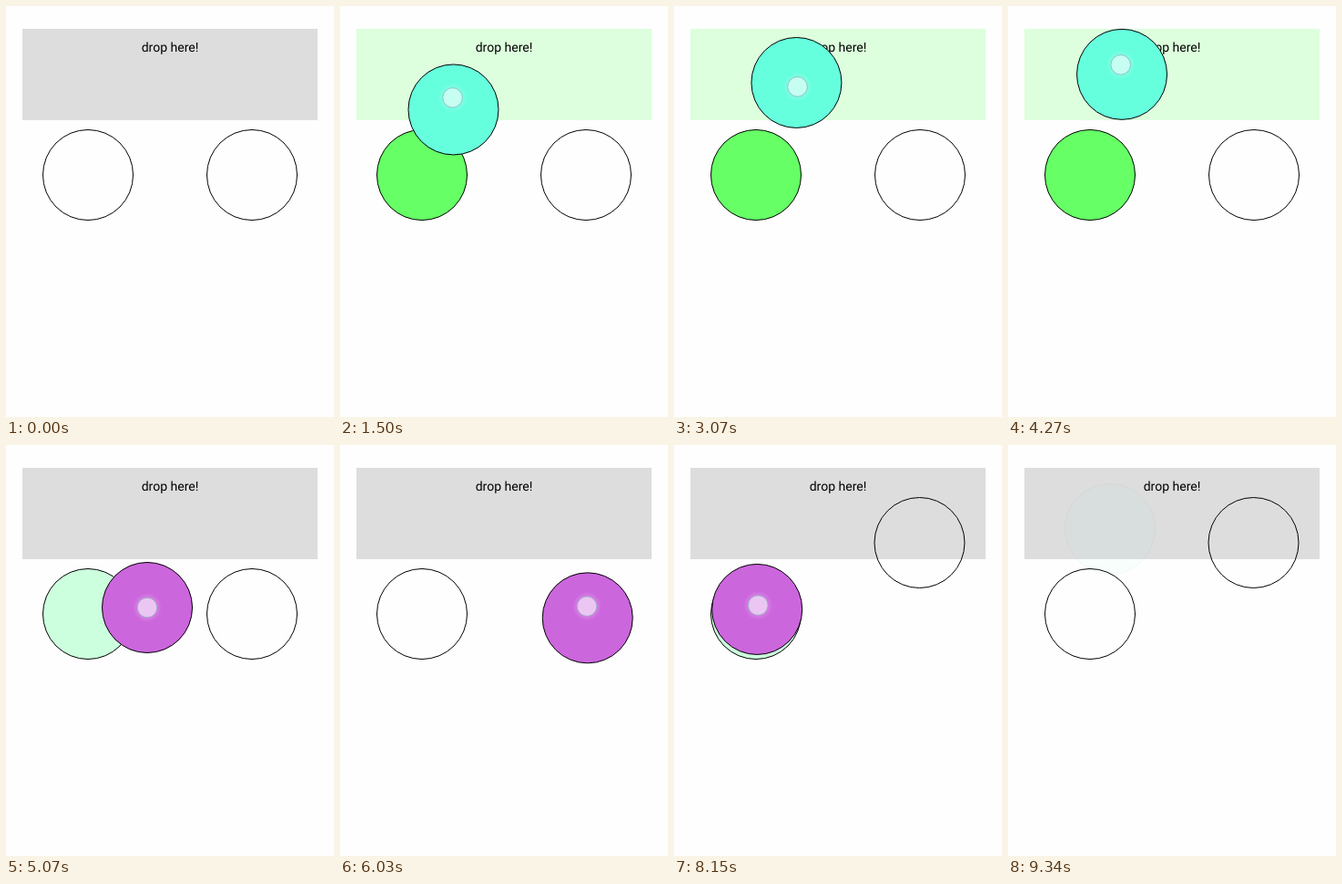
Animation of 360x450 px, one loop 9760 ms. Source, as an HTML page:

```html
<!DOCTYPE html>
<html lang="en">
<head>
<meta charset="utf-8">
<title>Drag and drop</title>
<style>
  html, body { margin: 0; width: 100%; height: 100%; overflow: hidden; background: #fefefe; }
  svg { display: block; width: 360px; height: 450px; }
  text {
    font: 14px Roboto, "Noto Sans", sans-serif;
    text-anchor: middle;
    text-rendering: geometricPrecision;
  }
  .ball { stroke: #000; stroke-width: 1; }
</style>
</head>
<body>
<svg viewBox="0 0 360 450">
  <defs>
    <radialGradient id="glow">
      <stop offset=".65" stop-color="#fff" stop-opacity=".18"/>
      <stop offset="1" stop-color="#fff" stop-opacity="0"/>
    </radialGradient>
  </defs>
  <rect id="zone" x="18" y="25" width="324" height="100"/>
  <text x="180" y="50">drop here!</text>
  <circle id="left" class="ball" r="49.5"/>
  <circle id="right" class="ball" r="49.5"/>
  <circle id="copy" class="ball" r="49.5"/>
  <g id="touch">
    <circle r="16" fill="url(#glow)"/>
    <circle r="10.8" fill="#fff" fill-opacity=".55" stroke="#7fa8b8" stroke-opacity=".7"/>
  </g>
</svg>
<script>
const LOOP = 9760, BEGIN = 150, REST = 9340, STEP = 1000 / 26;
const LEAD = 40;          // the finger runs this many ms ahead of the ball
const COPY_FADE = 540, FILL_FADE = 270, TOUCH_FADE = 120;
const LEFT = [90, 185], RIGHT = [270, 185];
const PURPLE = '#cc66dd', CYAN = '#66ffdd', MINT = '#ccffdd', GREEN = '#66ff66';

// Turning points of each drag: time, x, y
const drags = [
  { copies: true, press: 280, release: 5090, turns: [
    [380, ...LEFT], [900, 145, 143], [1325, 127, 149], [1667, 122, 78],
    [2300, 155, 86], [2900, 132, 74], [3720, 155, 168], [4030, 137, 168],
    [4309, 124.3, 69], [4980, 155, 178]] },
  { copies: false, press: 5640, release: 7150, turns: [
    [5720, ...RIGHT], [5900, 273, 213], [6300, 268, 120], [6903, 271.5, 62.2],
    [6993, 269.5, 107]] },
  { copies: true, press: 7990, release: 8820, turns: [
    [8060, ...LEFT], [8660, 112, 92]] }
];

const clamp = v => Math.max(0, Math.min(1, v));
const ease = u => (1 - Math.cos(Math.PI * clamp(u))) / 2;
const fade = (t, from, length) => clamp(1 - (t - from) / length);
const inZone = ([x, y]) => x > 18 && x < 342 && y > 25 && y < 125;
const [zone, left, right, copy, touch] =
  ['zone', 'left', 'right', 'copy', 'touch'].map(id => document.getElementById(id));

// Every leg adds its own eased share of the way
function posAt(turns, t) {
  let [, x, y] = turns[0];
  for (let i = 1; i < turns.length; i++) {
    const [t0, x0, y0] = turns[i - 1], [t1, x1, y1] = turns[i];
    const share = ease((t - t0) / (t1 - t0));
    x += (x1 - x0) * share;
    y += (y1 - y0) * share;
  }
  return [x, y];
}

function fingerAt(turns, t) {
  const a = posAt(turns, t - 1), b = posAt(turns, t + 1);
  return posAt(turns, t).map((v, i) => v + (b[i] - a[i]) / 2 * LEAD);
}

function place(node, [x, y], fill = '#fff', fillOpacity = 0, opacity = 1) {
  const attrs = { cx: x, cy: y, fill, 'fill-opacity': fillOpacity, opacity };
  for (const name in attrs) node.setAttribute(name, attrs[name]);
}

function draw(t) {
  let hot = false, finger = 0;
  place(left, LEFT);
  place(right, RIGHT);
  place(copy, LEFT, PURPLE, 1, 0);

  for (const { copies, press, release, turns } of drags) {
    if (t < press - TOUCH_FADE) continue;
    const pos = posAt(turns, t), over = inZone(pos), pressed = t >= press;
    const color = over ? CYAN : PURPLE;
    const tint = pressed ? fade(t, release, FILL_FADE) : 0;
    if (copies) {
      if (tint) place(left, LEFT, over ? GREEN : MINT, tint);
      place(copy, pos, color, 1, pressed ? fade(t, release, COPY_FADE) : 0);
    } else {
      place(right, pos, color, tint);
    }
    hot = hot || (pressed && t < release && over);

    const alpha = Math.min(1 - fade(t, press - TOUCH_FADE, TOUCH_FADE), fade(t, release, TOUCH_FADE));
    if (alpha > 0) {
      finger = alpha;
      touch.setAttribute('transform', `translate(${fingerAt(turns, t)})`);
    }
  }
  touch.setAttribute('opacity', finger);
  zone.setAttribute('fill', hot ? '#ddffdd' : '#dddddd');
}

// The picture advances 26 times a second, as a screen recording does
function snap(time) {
  const t = Math.min(time, REST);
  return BEGIN + Math.floor((t - BEGIN + 5) / STEP) * STEP;
}

const start = performance.now();
function tick() {
  draw(snap((performance.now() - start) % LOOP));
  requestAnimationFrame(tick);
}
tick();
</script>
</body>
</html>
```
